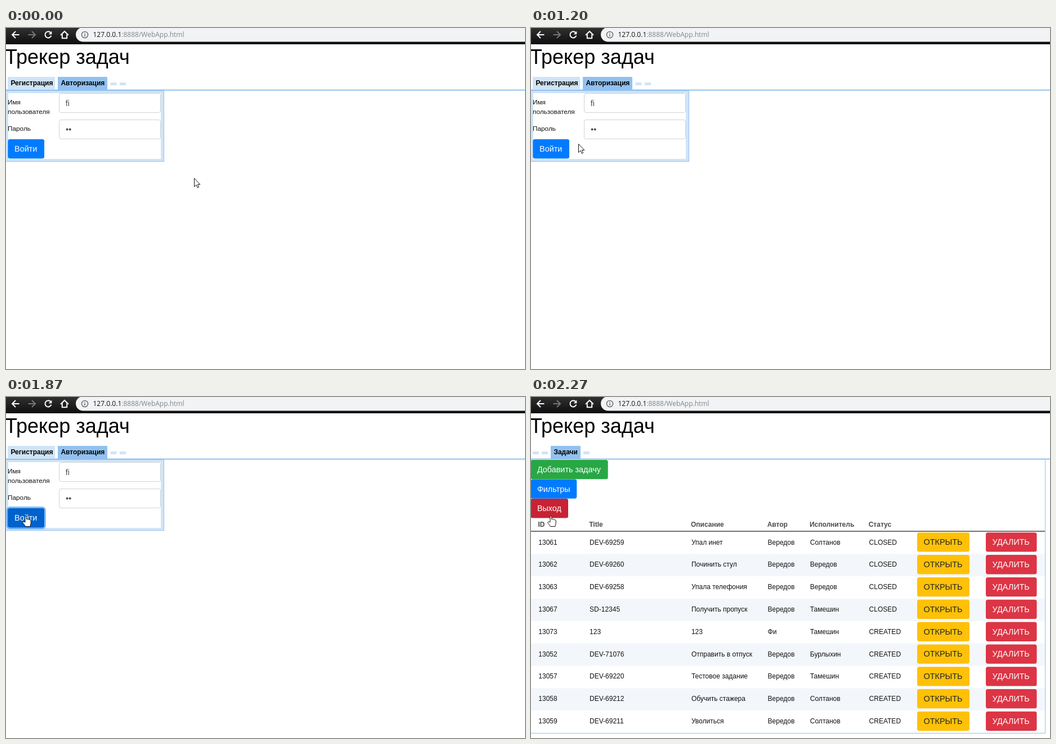
Recreate the animation shown at these times as an HTML page. Size 922x607 px, loop 2.34 s.

```html
<!DOCTYPE html>
<html lang="ru">
<head>
<meta charset="utf-8">
<title>Трекер задач</title>
<style>
  html, body { margin: 0; height: 100%; overflow: hidden; background: #fff; }
  svg { display: block; width: 100vw; height: 100vh; }
  text { font: 12px "Liberation Sans", Arial, sans-serif; fill: #111; white-space: pre; }
  .bold { font-weight: bold; }
  .btn { font-size: 14.4px; }
  .url { font-family: "Open Sans", "Noto Sans", sans-serif; }
  .icon { fill: none; stroke: #fff; stroke-width: 2; }
  .field { fill: #fff; stroke: #ced4da; }
  .cursor { fill: #fff; stroke: #111; stroke-linejoin: round; }
</style>
</head>
<body>
<svg viewBox="0 0 922 607">
  <defs>
    <linearGradient id="bar" x2="0" y2="1">
      <stop stop-color="#303030"/><stop offset=".8" stop-color="#151515"/><stop offset="1" stop-color="#0e0e0f"/>
    </linearGradient>
  </defs>

  <!-- browser bar -->
  <rect width="922" height="29" fill="url(#bar)"/>
  <rect x="124" y="-1" width="820" height="25.5" rx="12.75" fill="#f1f3f4"/>
  <g class="icon">
    <path d="M23.5 12H11.5M17 6L11 12L17 18"/>
    <path d="M39.5 12H51.5M46 6L52 12L46 18" stroke="#777"/>
    <path d="M79.3 8.2A5.6 5.6 0 1 0 80.4 13.5"/>
    <path d="M81.3 5.6V11.2H75.7Z" fill="#fff" stroke="none"/>
    <path d="M97 12.7L104 6L111 12.7M99.8 11V18.3H108.2V11"/>
    <g stroke="#5f6368" stroke-width="1.4">
      <circle cx="140" cy="12" r="5.6"/><path d="M140 11V15.2M140 8.6V10"/>
    </g>
  </g>
  <text class="url" x="154.5" y="16.3" fill="#222">127.0.0.1<tspan fill="#80868b">:8888/WebApp.html</tspan></text>

  <text x="-2" y="63.5" style="font-size:36px;fill:#000">Трекер задач</text>
  <rect y="109.5" width="922" height="2" fill="#92c1f0"/>

  <g id="login">
    <rect x="-1" y="111.5" width="281.5" height="126" fill="#d0e4f6" stroke="#92c1f0"/>
    <rect x="4" y="116" width="271" height="117" fill="#fff"/>
    <text x="3" y="136" style="font-size:11.8px">Имя</text>
    <text x="3" y="153" style="font-size:11.8px">пользователя</text>
    <text x="3" y="183" style="font-size:11.8px">Пароль</text>
    <rect class="field" x="94.5" y="116.5" width="180" height="34" rx="3.5"/>
    <rect class="field" x="94.5" y="163.5" width="180" height="34" rx="3.5"/>
    <text class="btn" x="105.7" y="138.5" style="fill:#495057">fi</text>
    <g fill="#495057"><circle cx="108.6" cy="180.5" r="2"/><circle cx="113.7" cy="180.5" r="2"/></g>
    <rect id="ring" fill="#007bff" fill-opacity=".5"/>
  </g>

  <g id="tasks"></g>

  <g id="list">
    <path d="M913.5 111V598.5H0" fill="none" stroke="#92c1f0"/>
  </g>

  <path id="arrow" class="cursor" d="M.5 .5V15.5L4 12.3L6.3 17.3L8.6 16.3L6.4 11.4H10.8Z"/>
  <path id="hand" class="cursor" d="M1 12V1.6Q2.3 -.2 3.7 1.6V6.6Q5.5 5.4 6.7 7.1Q8.5 6.1 9.2 7.8Q11 7.2 11.2 9.2V14L9.8 19.5H1.5Q0 16.5 -3.5 12.6Q-2.5 9.8 1 12Z"/>
</svg>

<script>
const $ = id => document.getElementById(id);

function add(parent, tag, attrs, content = "") {
  const el = document.createElementNS("http://www.w3.org/2000/svg", tag);
  for (const key in attrs) el.setAttribute(key, attrs[key]);
  el.textContent = content;
  return $(parent).appendChild(el);
}

const box = (parent, x, y, width, height, fill, rx = 0) =>
  add(parent, "rect", { x, y, width, height, fill, rx });

const label = (parent, x, y, content, cls = "", fill = "#111") =>
  add(parent, "text", { x, y, class: cls, style: "fill:" + fill }, content);

// Returns the darker layer that fades in on hover.
function button(parent, x, y, width, content, fill, hover = fill, ink = "#fff") {
  box(parent, x, y, width, 34.3, fill, 3.6);
  const shade = box(parent, x, y, width, 34.3, hover, 3.6);
  shade.setAttribute("opacity", 0);
  label(parent, x + 11.6, y + 22, content, "btn", ink);
  return shade;
}

function tab(parent, x, width, content, fill) {
  box(parent, x, 87, width, 23, fill);
  label(parent, x + 5.4, 102, content, "bold", "#000");
}

const emptyTabs = (parent, ...xs) => xs.forEach(x => box(parent, x, 97, 11, 5, "#d0e4f6"));

tab("login", 3, 84, "Регистрация", "#d0e4f6");
tab("login", 92, 88, "Авторизация", "#92c1f0");
emptyTabs("login", 185.5, 202);
const enter = button("login", 3.5, 198, 64.5, "Войти", "#007bff", "#0069d9");

emptyTabs("tasks", 3, 19, 93);
tab("tasks", 35, 53, "Задачи", "#92c1f0");

button("list", -.7, 112, 137.4, "Добавить задачу", "#28a745");
button("list", -.7, 146.5, 82, "Фильтры", "#007bff");
const leave = button("list", -.7, 181, 66.7, "Выход", "#dc3545", "#c82333");

const columns = [12.7, 103.5, 284.3, 420, 495.2, 600];
["ID", "Title", "Описание", "Автор", "Исполнитель", "Статус"].forEach((name, i) =>
  label("list", columns[i] - .3, 231, name, "bold", "#4b4a4a"));

const rows = `13061|DEV-69259|Упал инет|Вередов|Солтанов|CLOSED
13062|DEV-69260|Починить стул|Вередов|Вередов|CLOSED
13063|DEV-69258|Упала телефония|Вередов|Вередов|CLOSED
13067|SD-12345|Получить пропуск|Вередов|Тамешин|CLOSED
13073|123|123|Фи|Тамешин|CREATED
13052|DEV-71076|Отправить в отпуск|Вередов|Бурлыхин|CREATED
13057|DEV-69220|Тестовое задание|Вередов|Тамешин|CREATED
13058|DEV-69212|Обучить стажера|Вередов|Солтанов|CREATED
13059|DEV-69211|Уволиться|Вередов|Солтанов|CREATED`.split("\n");

rows.forEach((row, i) => {
  const y = 239.5 + 39.82 * i;
  if (i % 2) box("list", 0, y, 913, 39.8, "#f3f7fb");
  row.split("|").forEach((cell, c) => label("list", columns[c] + .6, y + 23, cell));
  button("list", 686, y + 1.8, 93, "ОТКРЫТЬ", "#ffc107", "#ffc107", "#212529");
  button("list", 808, y + 1.8, 90.5, "УДАЛИТЬ", "#dc3545");
});
box("list", 0, 238, 913, 2, "#6f7277");

// Pointer path, one point per step of 1/15 s, starting at step 9.
const pathX = [334, 328, 310, 285, 252, 216, 178, 142, 109, 84, 70, 58, 47, 39, 33];
const pathY = [267, 257, 248, 240, 232, 224, 216, 210, 205, 206, 207, 208, 209, 210, 211];

const LOOP = 2340, STEP = 1000 / 15;
const clamp = v => Math.min(1, Math.max(0, v));
const ease = v => { v = clamp(v); return v * v * (3 - 2 * v); };
const show = (el, on) => el.setAttribute("visibility", on ? "visible" : "hidden");

function draw(time) {
  const k = Math.min(34, Math.floor((time % LOOP + 4) / STEP));
  const i = Math.min(14, Math.max(0, k - 9));
  const loggedIn = k >= 30, loaded = k >= 32;
  const overButton = loaded || (!loggedIn && k >= 20);

  show($("login"), !loggedIn);
  show($("tasks"), loggedIn);
  show($("list"), loaded);

  enter.setAttribute("opacity", ease((k - 20) / 2.3));
  enter.setAttribute("fill", k >= 26 && k < 29 ? "#0062cc" : "#0069d9");
  leave.setAttribute("opacity", ease((k - 31.7) / 2.3));

  const spread = 2.9 * ease((k - 25) / 3);
  const ring = { x: 3.5 - spread, y: 198 - spread, width: 64.5 + 2 * spread, height: 34.3 + 2 * spread, rx: 3.6 + spread };
  for (const key in ring) $("ring").setAttribute(key, ring[key]);

  for (const id of ["arrow", "hand"]) {
    $(id).setAttribute("transform", `translate(${pathX[i]} ${pathY[i]})`);
    show($(id), (id === "hand") === overButton);
  }
}

let start;
function tick(now) {
  start ??= now;
  draw(now - start);
  requestAnimationFrame(tick);
}
draw(0);
requestAnimationFrame(tick);
</script>
</body>
</html>
```
